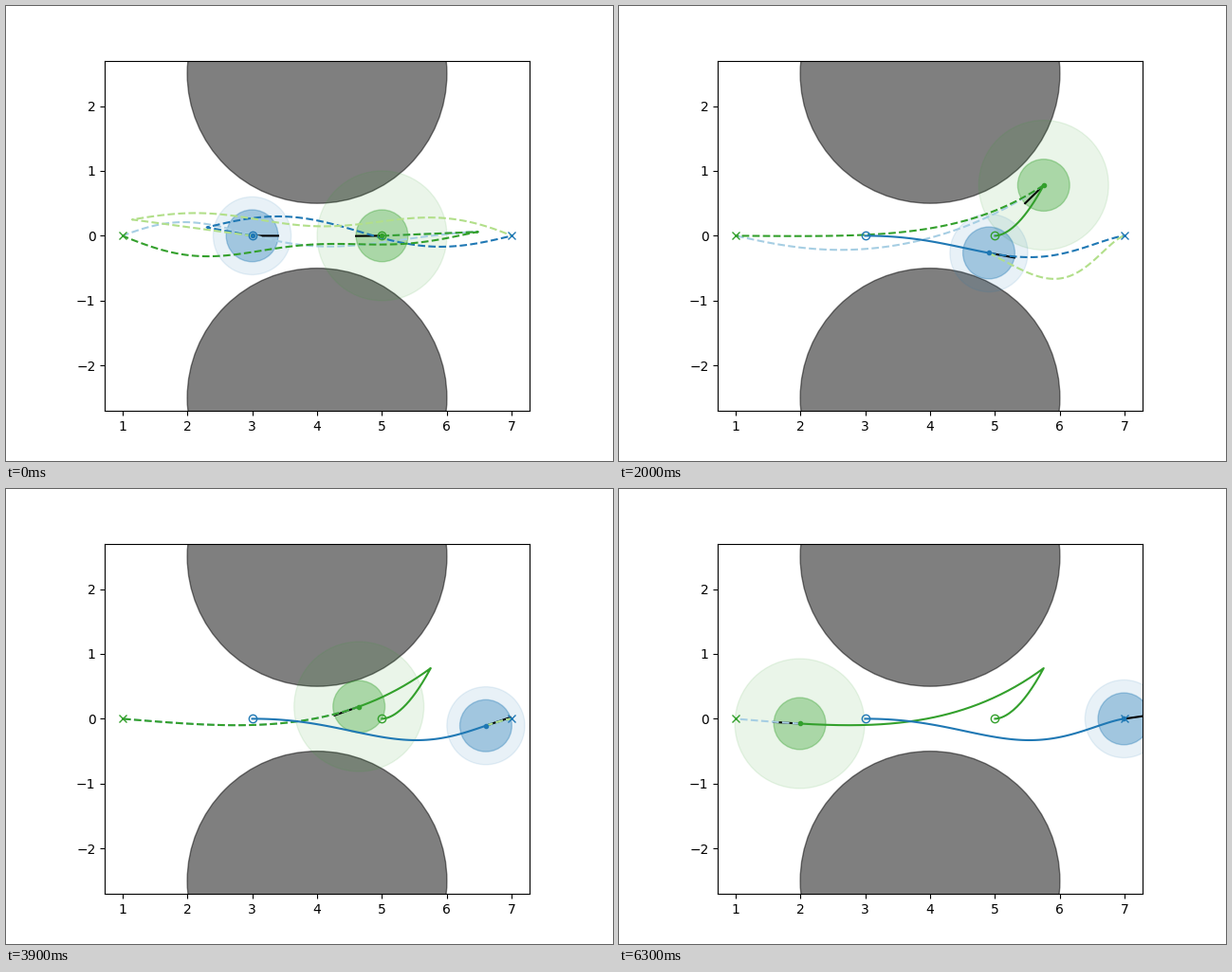
Recreate the animation shown at these times as a matplotlib script. Size 640 by 480 pixels, loop 6.4 s.

```python
import numpy as np
import matplotlib.pyplot as plt
from matplotlib.animation import FuncAnimation
from matplotlib.patches import Circle

FRAMES, STEP = 64, 100
BLUE, GREEN = "#1f78b4", "#33a02c"
PALE_BLUE, PALE_GREEN = "#a6cee3", "#b2df8a"
CUSP = np.array([5.75, .78])     # where the green robot reverses
BACKUP, RETURN = .75, 4.75       # x distances before and after the cusp
pi = np.pi


def ease(u):
    u = np.clip(u, 0, 1)
    return u * u * (3 - 2 * u)


def approach(t, tau):
    """Start from rest, then settle slowly: 0 to 1."""
    return 1 - np.exp(-(max(t, 0) / tau) ** 1.9)


def dip(u, depth, peak, power):
    """Smooth sag of given depth that is zero at u = 0 and u = 1."""
    arch = np.sin(pi * np.clip(u, 0, 1) ** (np.log(.5) / np.log(peak)))
    return -depth * np.clip(arch, 0, 1) ** power


# Robot paths
def blue_y(x, depth=.33, peak=.6325, power=1.4):
    return dip((x - 3) / 4, depth, peak, power)


def out_y(x):
    return CUSP[1] * np.clip((x - 5) / BACKUP, 0, 1) ** 1.8


def back_y(x, sag=.124, peak=.5, power=1):
    v = np.clip((x - 1) / RETURN, 0, 1)
    return CUSP[1] * v ** 4 + dip(v, sag, peak, power)


def green_xy(s, **sag):
    """Point at signed x distance s past the cusp."""
    x = CUSP[0] - abs(s)
    return x, np.where(s < 0, out_y(x), back_y(x, **sag))


def blue_x(t):
    return 3 + 4 * approach(t, 2.515)


def green_s(t):
    return -BACKUP * (1 - ease(t / 1.72)) + RETURN * approach(t - 2.35, 3.12)


def slope_angle(f, x, h=.005):
    return np.arctan2(f(x + h) - f(x - h), 2 * h)


def blue_heading(x):
    return slope_angle(blue_y, min(x, 6.97))


def green_heading(t, x):
    out, back = slope_angle(out_y, min(x, 5.74)), slope_angle(back_y, min(x, 5.74))
    return pi + out + (back - out) * ease((t - 1.5) / .8)


# Rough first guesses, v running from the turning tip to the goal
def blue_guess(v):
    return .13 * (1 - v) + .2 * np.sin(2 * pi * v)


def pale_green_guess(v):
    return .25 * (1 - v ** 6) + .1 * np.sin(3 * pi * v)


def green_guess(v):
    return .06 * (1 - v) + dip(v, .3, .63, 1) - .09 * np.sin(3 * pi * v)


def pale_blue_guess(v):
    return .06 * (1 - v) - .2 * np.sin(2 * pi * v ** 1.555)


def guess_route(pos, tip, goal, wave):
    lead, v = np.linspace(0, 1, 20), np.linspace(0, 1, 100)
    x = np.append(pos[0] + (tip - pos[0]) * lead, tip + (goal - tip) * v)
    y = np.append(pos[1] + (wave(0) - pos[1]) * lead, wave(v))
    return np.array([x, y])


# Settled plans, always leaving from the robot
def pinned(x, y, pos):
    fade = np.linspace(1, 0, len(x)) ** 3
    return np.array([x, y + (pos[1] - y[0]) * fade])


def blue_route(pos, **shape):
    x = np.linspace(pos[0], 7, 120)
    return pinned(x, blue_y(x, **shape), pos)


def green_route(pos, s, **sag):
    return pinned(*green_xy(np.linspace(s, RETURN, 120), **sag), pos)


def mix(a, b, w):
    return a + (b - a) * w


fig, ax = plt.subplots(figsize=(6.4, 4.8), dpi=100)
ax.set_aspect("equal")
ax.set(xlim=(.73, 7.27), ylim=(-2.7, 2.7),
       xticks=range(1, 8), yticks=range(-2, 3))


def add_disc(x, y, radius, color, alpha):
    return ax.add_patch(Circle((x, y), radius, color=color, alpha=alpha))


def add_line(color, z, style="-"):
    return ax.plot([], [], style, color=color, lw=1.5, zorder=z)[0]


class Robot:
    def __init__(self, start, goal, color, reach):
        self.discs = [add_disc(start, 0, reach, color, .1),
                      add_disc(start, 0, .4, color, .35)]
        self.nose = add_line("black", 2)
        self.trail = add_line(color, 3)
        self.dot = ax.plot([], [], "o", color=color, ms=3, zorder=4)[0]
        ax.plot(start, 0, "o", mfc="none", mec=color, ms=6, zorder=3)
        ax.plot(goal, 0, "x", color=color, ms=6, zorder=3)

    def move(self, trail, angle):
        x, y = trail[0][-1], trail[1][-1]
        for disc in self.discs:
            disc.center = x, y
        self.nose.set_data([x, x + .4 * np.cos(angle)],
                           [y, y + .4 * np.sin(angle)])
        self.trail.set_data(*trail)
        self.dot.set_data([x], [y])
        return x, y


for y in (-2.5, 2.5):
    add_disc(4, y, 2, "black", .5)
green = Robot(5, 1, GREEN, 1)
blue = Robot(3, 7, BLUE, .6)
pale_blue_plan = add_line(PALE_BLUE, 2.3, "--")
blue_plan = add_line(BLUE, 2.4, "--")
pale_green_plan = add_line(PALE_GREEN, 2.5, "--")
green_plan = add_line(GREEN, 2.6, "--")


def draw(i):
    t = i * STEP / 1000
    x, s = blue_x(t), green_s(t)
    xs = np.linspace(3, x, 80)
    b = blue.move((xs, blue_y(xs)), blue_heading(x))
    steps = np.linspace(-BACKUP, s, 160)
    if s > 0:
        steps = np.sort(np.append(steps, 0))
    g = green.move(green_xy(steps), green_heading(t, CUSP[0] - abs(s)))

    # each robot's own plan, and what the other one expects of it
    agree = ease((t - 2.1) / .9)
    own_blue = blue_route(b, depth=mix(.45, .33, ease((t - 1) / 1)))
    seen_blue = mix(blue_route(b, depth=.67, peak=.725, power=1.5),
                    own_blue, agree)
    own_green = green_route(g, s, sag=np.interp(t, [1.2, 2, 3.9], [.04, .01, .124]))
    seen_green = mix(green_route(g, s, sag=.23, peak=.38, power=1.5),
                     own_green, agree)

    settle = 1 - np.exp(-t / .12)
    for line, tip, goal, wave, pos, route in (
            (blue_plan, 2.3, 7, blue_guess, b, own_blue),
            (pale_green_plan, 1.15, 7, pale_green_guess, b, seen_blue),
            (green_plan, 6.48, 1, green_guess, g, own_green),
            (pale_blue_plan, 6.48, 1, pale_blue_guess, g, seen_green)):
        line.set_data(*mix(guess_route(pos, tip, goal, wave), route, settle))
    green_plan.set_visible(t < 5.6)
    return []


anim = FuncAnimation(fig, draw, frames=FRAMES, interval=STEP,
                     repeat=True, repeat_delay=0, blit=False)
plt.show()
```
